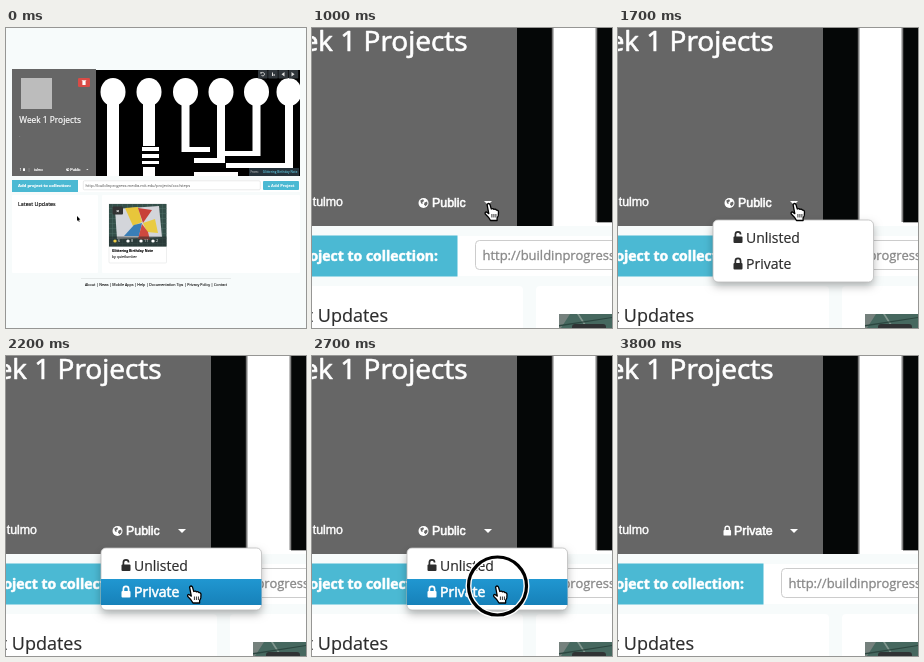
An HTML page with a canvas for the animation above (4200 ms loop, 300x300 px).

```html
<!DOCTYPE html>
<html lang="en">
<head>
<meta charset="utf-8">
<title>Change project visibility</title>
<style>
html, body { margin: 0; width: 100%; height: 100%; overflow: hidden; background: #f7fbfb; }
canvas { display: block; width: 300px; height: 300px; }
</style>
</head>
<body>
<canvas id="stage"></canvas>
<script>
const canvas = document.getElementById('stage');
const ctx = canvas.getContext('2d');
const ratio = window.devicePixelRatio || 1;
canvas.width = canvas.height = Math.round(300 * ratio);

const LOOP = 4200;
const SANS = '"Open Sans", sans-serif';
const ARIAL = '"Liberation Sans", Arial, sans-serif';
const PAGE = '#f7fbfb', PANEL = '#666', CYAN = '#4bb9d3', INK = '#2d2d2d';
const URL_TEXT = 'http://buildinprogress.media.mit.edu/projects/xxx/steps';
const USER = 'tulmo', MAKER = 'quietlumber', PROJECT = 'Glittering Birthday Note';

function rect(x, y, w, h, fill) {
  ctx.fillStyle = fill;
  ctx.fillRect(x, y, w, h);
}

function box(x, y, w, h, r, fill, line, width = 1) {
  ctx.beginPath();
  ctx.roundRect(x, y, w, h, r);
  if (fill) { ctx.fillStyle = fill; ctx.fill(); }
  if (line) { ctx.strokeStyle = line; ctx.lineWidth = width; ctx.stroke(); }
}

// heft thickens the glyphs slightly, like smoothed screen type
function text(s, x, y, size, fill, { weight = 400, align = 'left', family = SANS, heft = 0 } = {}) {
  ctx.font = `${weight} ${size}px ${family}`;
  ctx.textAlign = align;
  ctx.fillStyle = fill;
  ctx.fillText(s, x, y);
  if (!heft) return;
  ctx.strokeStyle = fill;
  ctx.lineWidth = heft;
  ctx.lineJoin = 'round';
  ctx.strokeText(s, x, y);
}

function shape(points, fill) {
  ctx.beginPath();
  for (let i = 0; i < points.length; i += 2) ctx.lineTo(points[i], points[i + 1]);
  ctx.closePath();
  ctx.fillStyle = fill;
  ctx.fill();
}

function ellipse(x, y, rx, ry, fill) {
  ctx.beginPath();
  ctx.ellipse(x, y, rx, ry, 0, 0, Math.PI * 2);
  ctx.fillStyle = fill;
  ctx.fill();
}

function fade(x, y, w, h, from, to) {
  const g = ctx.createLinearGradient(x, 0, x + w, 0);
  g.addColorStop(0, from);
  g.addColorStop(1, to);
  rect(x, y, w, h, g);
}

function at(x, y, scale, draw) {
  ctx.save();
  ctx.translate(x, y);
  ctx.scale(scale, scale);
  draw();
  ctx.restore();
}

function globe(x, y, scale = 1) {
  at(x, y, scale, () => {
    ellipse(0, 0, 5, 5, '#fff');
    shape([-3.2, -2.4, -.4, -3.8, .6, -2, -1.2, -.8, -.6, .8, -2.4, .4], PANEL);
    shape([1, -.6, 3.6, -1.6, 4, 1, 2, 3.2, .6, 1.4], PANEL);
  });
}

function caret(x, y, scale = 1) {
  at(x, y, scale, () => shape([-4, -2, 4, -2, 0, 2], '#fff'));
}

function lock(x, y, fill, open, scale = 1) {
  at(x, y, scale, () => {
    box(0, 5.4, 9, 6.6, 1, fill);
    ctx.beginPath();
    ctx.moveTo(1.9, 6);
    ctx.lineTo(1.9, 3.4);
    ctx.arc(4.5, 3.4, 2.6, Math.PI, 0);
    if (!open) ctx.lineTo(7.1, 6);
    ctx.strokeStyle = fill;
    ctx.lineWidth = 1.7;
    ctx.stroke();
  });
}

function hand(x, y) {
  at(x, y, 1, () => {
    const p = new Path2D('M2.6 1.6Q3.8-.5 5.4 1.4L6.8 6Q8.4 4.9 9.4 6.4Q11 5.5 12 7.2Q13.8 6.8 14 9L13.8 12.4Q13.4 14 12.6 15L12.6 17.5L6 17.5Q4.4 14.2.8 11Q0 9 2 9L4.3 10.6Z');
    ctx.lineJoin = 'round';
    ctx.fillStyle = '#fff';
    ctx.strokeStyle = '#000';
    ctx.lineWidth = 1.3;
    ctx.fill(p);
    ctx.stroke(p);
    ctx.beginPath();
    for (const i of [7.4, 9.4, 11.4]) { ctx.moveTo(i, 11); ctx.lineTo(i, 14.5); }
    ctx.lineWidth = .8;
    ctx.stroke();
  });
}

function ring(x, y) {
  for (const [color, width] of [['#fff', 6], ['#000', 3.2]]) {
    ctx.beginPath();
    ctx.arc(x, y, 29, 0, Math.PI * 2);
    ctx.strokeStyle = color;
    ctx.lineWidth = width;
    ctx.stroke();
  }
}

function circuit() {
  ctx.save();
  ctx.beginPath();
  ctx.rect(90, 42, 204, 106);
  ctx.clip();
  rect(90, 42, 204, 106, '#000');
  const pads = [[107, 12, 148], [143, 12, 118], [179.5, 8, 124], [215, 8, 135], [250.5, 8, 128], [283, 8, 140]];
  for (const [x, w, end] of pads) {
    ellipse(x, 64, 12.5, 14, '#fff');
    rect(x - w / 2, 72, w, end - 72, '#fff');
  }
  rect(136, 119, 17, 4, '#fff');
  rect(136, 126, 17, 4, '#fff');
  rect(136, 133, 17, 3, '#fff');
  rect(137, 139, 12, 9, '#fff');
  rect(176, 119, 28, 5, '#fff');
  rect(188, 130, 31, 5, '#fff');
  rect(214, 123, 40, 5, '#fff');
  rect(220, 135, 67, 5, '#fff');
  rect(188, 144, 44, 4, '#fff');
  ctx.restore();
}

function toolbar() {
  for (let i = 0; i < 4; i++) box(252 + i * 10.2, 42, 9.6, 8.5, .8, '#30363b');
  ctx.strokeStyle = '#ddd';
  ctx.lineWidth = .8;
  ctx.beginPath();
  ctx.arc(256.8, 46.2, 1.7, -2.5, 2.6);
  ctx.stroke();
  shape([254.4, 44, 256.4, 44.6, 254.6, 46], '#ddd');
  rect(266, 44.5, 1, 3.5, '#ddd');
  rect(267.6, 46, 1, 2, '#ddd');
  shape([278.5, 44, 278.5, 48.4, 275.5, 46.2], '#ddd');
  shape([285.5, 44, 285.5, 48.4, 288.5, 46.2], '#ddd');
}

function thumbnail() {
  box(103, 175.5, 57.5, 59.5, 1, '#fff', '#e2e5e5', .6);
  rect(103, 176, 57.5, 42.5, '#344f49');
  for (let x = 106; x < 160; x += 5) rect(x, 176, .4, 42, '#52736b');
  for (let y = 180; y < 218; y += 5) rect(103, y, 57.5, .4, '#52736b');
  shape([109, 181, 153, 178, 156, 209, 111, 211], '#d3d5da');
  shape([119, 180, 132, 179, 136, 194, 127, 198], '#e8c63b');
  shape([132, 180, 146, 182, 137, 195], '#c84038');
  shape([128, 197, 136, 195, 133, 208, 118, 208], '#397eb6');
  shape([137, 195, 149, 191, 152, 205, 141, 204], '#e9cb43');
  shape([136, 196, 142, 204, 144, 212, 132, 211], '#cf493f');
  rect(103, 208.5, 57.5, 10, 'rgba(35,45,45,.55)');
  box(106.5, 178.5, 10.5, 8, 1, '#333');
  text('×', 111.8, 184.5, 6, '#fff', { align: 'center', weight: 700 });
  for (const [x, n] of [[109, 6], [122, 8], [135, 11], [147, 2]]) {
    ellipse(x, 213, 1.7, 1.6, x < 110 ? '#f0ce45' : '#fff');
    text(n, x + 3, 214.4, 3.8, '#fff');
  }
  text(PROJECT, 106, 224, 3.4, '#000', { weight: 700, heft: .1 });
  text('by ' + MAKER, 106, 230, 3.5, '#222', { heft: .1 });
}

function overview() {
  rect(0, 0, 300, 300, PAGE);
  rect(6, 41, 84, 107, PANEL);
  circuit();
  toolbar();
  rect(243, 140, 50, 8, '#24323a');
  text('From: ', 244.5, 145.4, 3, '#ddd');
  text(PROJECT, 291.5, 145.4, 3, '#5bc6df', { weight: 600, align: 'right' });

  rect(15, 50, 31, 31, '#bcbcbc');
  box(72, 50, 12, 9, 1.2, '#d94b46');
  rect(76.4, 53, 3.2, 4, '#fff');
  rect(75.8, 52, 4.4, .7, '#fff');
  text('Week 1 Projects', 13.3, 95, 8.4, '#fff', { heft: .2 });
  text('-', 13, 109, 4, '#ccc');
  text('1', 13.5, 143, 3.7, '#fff', { weight: 600 });
  rect(17, 140.3, 2, 2.7, '#fff');
  text('|', 22, 143, 3.7, '#ddd');
  text(USER, 37, 143, 3.72, '#fff', { align: 'right', family: ARIAL, heft: .15 });
  globe(61.7, 141.4, .3);
  text('Public', 64.3, 142.8, 3.72, '#fff', { family: ARIAL, heft: .2 });
  caret(81.3, 141.5, .3);

  rect(6, 152, 288, 12, '#fff');
  rect(6, 152, 66, 12, CYAN);
  text('Add project to collection:', 12, 159.2, 4.25, '#fff', { weight: 700, heft: .15 });
  box(77.3, 152.8, 177, 9, 1.2, '#fff', '#ccc', .4);
  text(URL_TEXT, 79.6, 158.8, 4, '#777', { heft: .1 });
  box(257, 153, 36, 9, 1, CYAN);
  text('+ Add Project', 275, 159, 4.2, '#fff', { weight: 600, align: 'center', heft: .12 });

  box(6, 167, 86, 78, 1, '#fff');
  box(96, 167, 198, 78, 1, '#fff');
  text('Latest Updates', 12, 177.7, 5.4, '#111', { heft: .15 });
  thumbnail();
  at(71, 188, 1, () => shape([0, 0, 0, 5, 1.1, 4, 1.9, 5.8, 2.7, 5.4, 1.9, 3.7, 3.4, 3.6], '#000'));

  rect(75, 250, 150, .5, '#d5d9d9');
  const links = ['About', 'News', 'Mobile Apps', 'Help', 'Documentation Tips', 'Privacy Policy', 'Contact'];
  text(links.join(' | '), 150, 257.6, 3.65, '#111', { align: 'center', heft: .1 });
}

function closeup(status) {
  rect(0, 0, 300, 300, PAGE);
  rect(0, 0, 205, 198, PANEL);
  rect(205, 0, 95, 198, '#fff');
  rect(205, 0, 35, 198, '#050707');
  rect(285, 0, 15, 194, '#050707');
  fade(239.5, 0, 3, 198, '#333', '#fff');
  fade(282.5, 0, 3, 194, '#fff', '#444');
  rect(285, 194, 15, 1, '#aaa');

  text('Week 1 Projects', 155.6, 23, 28, '#fff', { align: 'right', heft: .7 });
  text(USER, 31, 178, 12.4, '#fff', { align: 'right', family: ARIAL, heft: .4 });
  const isPublic = status === 'Public';
  if (isPublic) globe(111.5, 175);
  else lock(105.5, 169.5, '#fff', false, .84);
  text(status, isPublic ? 120 : 116, 179, 12.4, '#fff', { family: ARIAL, heft: .6 });
  caret(176, 175);

  rect(0, 208, 300, 40, '#fff');
  rect(0, 207.5, 145.5, 41, CYAN);
  text('Add project to collection:', 126, 233, 14, '#fff', { weight: 700, align: 'right', heft: .5 });
  box(163.5, 212.5, 180, 29, 4, '#fff', '#ccc');
  text(URL_TEXT, 170.5, 232, 13, '#888', { heft: .3 });

  box(-10, 258, 221, 60, 4, '#fff');
  box(224, 258, 100, 60, 4, '#fff');
  text('Latest Updates', 76, 294, 18, INK, { align: 'right', heft: .2 });
  rect(247, 286, 53, 14, '#46685f');
  shape([247, 286, 258, 286, 249, 300, 247, 300], '#75817d');
  shape([265, 286, 267, 286, 276, 300, 274, 300], '#82978f');
  shape([247, 297, 300, 289, 300, 290, 247, 298.5], '#2c4740');
  box(260, 296, 34, 20, 3, '#303334');
}

function menu(active) {
  ctx.save();
  ctx.shadowColor = 'rgba(0,0,0,.3)';
  ctx.shadowBlur = 8 * ratio;
  ctx.shadowOffsetY = 4 * ratio;
  box(95, 192, 160.5, 62, 5, '#fff');
  ctx.restore();
  box(95, 192, 160.5, 62, 5, '#fff', '#bbb', .8);
  if (active) {
    const blue = ctx.createLinearGradient(0, 223, 0, 249);
    blue.addColorStop(0, '#2097d1');
    blue.addColorStop(1, '#1781b9');
    rect(95, 223, 160.5, 26, blue);
  }
  const tone = active ? '#fff' : INK;
  lock(115.5, 203, INK, true);
  text('Unlisted', 128, 215, 14, INK, { heft: .2 });
  lock(115.5, 229.5, tone, false);
  text('Private', 128, 241, 14, tone, { heft: active ? .6 : .2 });
}

function draw(t) {
  ctx.setTransform(ratio, 0, 0, ratio, 0, 0);
  if (t < 1000) return overview();
  closeup(t < 3200 ? 'Public' : 'Private');
  if (t >= 3200) return;
  if (t >= 1700) menu(t >= 2200);
  if (t >= 1500 && t < 1700) ring(177.5, 175.5);
  if (t >= 2700) ring(185.5, 230);
  if (t < 2200) hand(172.5, 175);
  else hand(181, 229.5);
}

const start = performance.now();
function tick() {
  draw((performance.now() - start) % LOOP);
  requestAnimationFrame(tick);
}
tick();
</script>
</body>
</html>
```
